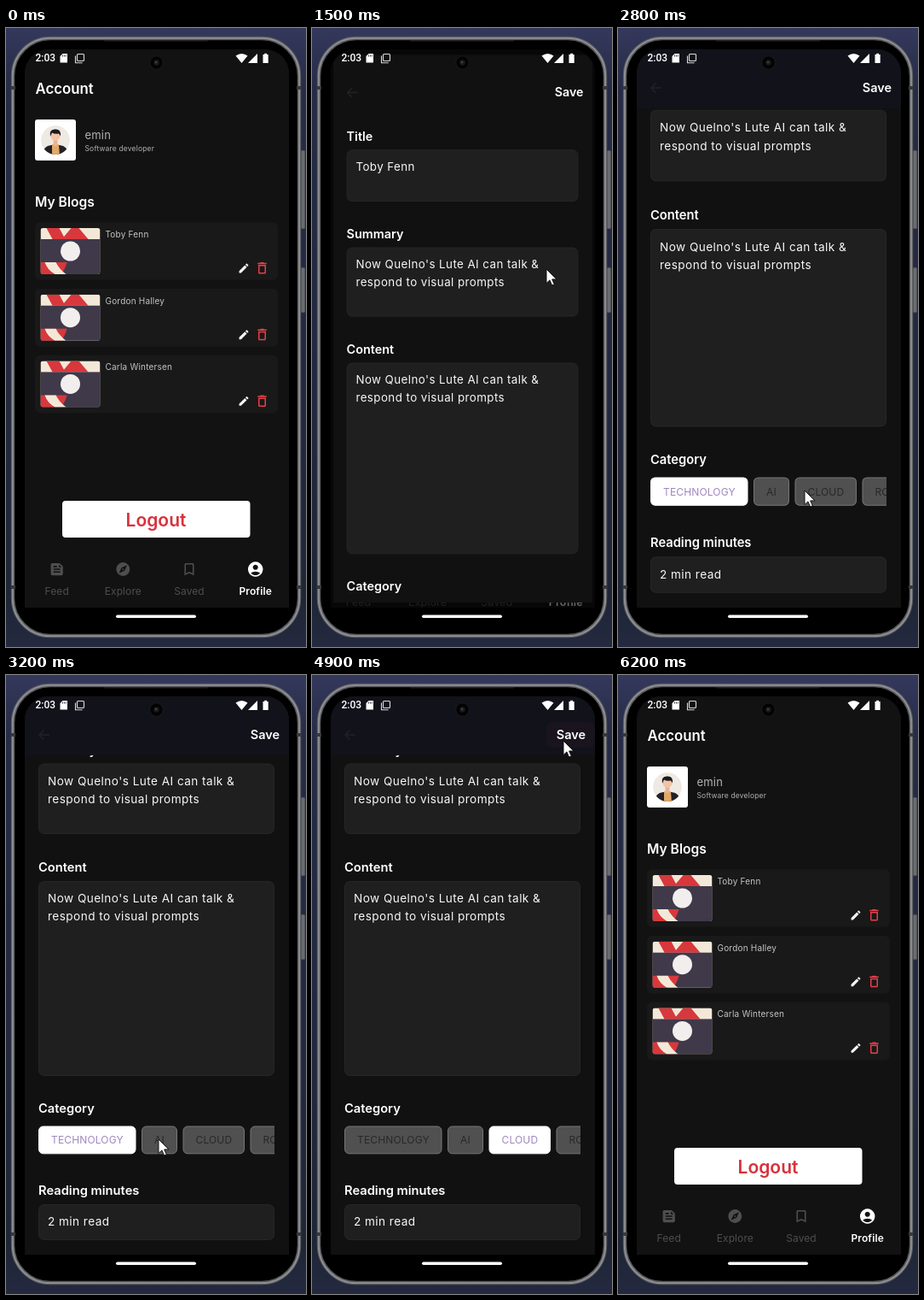
Recreate the animation shown at these times as an HTML page. Size 352 by 724 pixels, loop 6400 ms.

```html
<!DOCTYPE html>
<html lang="en">
<head>
<meta charset="utf-8">
<title>Blog app</title>
<style>
html, body { margin: 0; width: 100%; height: 100%; overflow: hidden; background: #23273f; }
svg { display: block; width: 352px; height: 724px; }
text { font-family: Inter, Roboto, sans-serif; white-space: pre; }
</style>
</head>
<body>
<svg id="stage" viewBox="0 0 352 724" xmlns="http://www.w3.org/2000/svg"></svg>
<script>
const LOOP = 6400, STEP = 100, MAX_SCROLL = 151;
const stage = document.getElementById('stage');

// Markup helpers
const rect = (x, y, w, h, fill, r = 0, more = '') =>
  `<rect x="${x}" y="${y}" width="${w}" height="${h}" rx="${r}" fill="${fill}" ${more}/>`;
const circle = (x, y, r, fill, more = '') =>
  `<circle cx="${x}" cy="${y}" r="${r}" fill="${fill}" ${more}/>`;
const path = (d, fill, more = '') => `<path d="${d}" fill="${fill}" ${more}/>`;
const text = (s, x, y, size, fill = '#fff', weight = 400, ls = 0, more = '') =>
  `<text x="${x}" y="${y}" font-size="${size}" fill="${fill}" font-weight="${weight}" letter-spacing="${ls}" ${more}>${s}</text>`;
const icon = (d, cx, cy, size, fill) =>
  `<g transform="translate(${cx - size / 2} ${cy - size / 2}) scale(${size / 24})">${path(d, fill, 'fill-rule="evenodd"')}</g>`;

const ICONS = {
  feed: 'M16 3H5c-1.1 0-2 .9-2 2v14c0 1.1.9 2 2 2h14c1.1 0 2-.9 2-2V8zM7 7h5v2H7zM17 17H7v-2h10zM17 13H7v-2h10zM15 9V5l4 4z',
  explore: 'M12 10.9a1.1 1.1 0 1 0 .01 0zM12 2a10 10 0 1 0 .01 0zM14.2 14.2L6 18l3.8-8.2L18 6z',
  saved: 'M17 3H7c-1.1 0-2 .9-2 2v16l7-3 7 3V5c0-1.1-.9-2-2-2zM17 18l-5-2.2L7 18V5h10z',
  profile: 'M12 2a10 10 0 1 0 .01 0zM12 6a3.5 3.5 0 1 1-.01 0zM12 20c-2 0-4.4-.8-6.1-2.9C7.5 15.8 9.7 15 12 15s4.5.8 6.1 2.1C16.4 19.2 14 20 12 20z',
  edit: 'M3 17.25V21h3.75L17.8 9.94l-3.75-3.75zM20.7 7.04c.4-.4.4-1 0-1.4L18.4 3.3c-.4-.4-1-.4-1.4 0l-1.9 1.8 3.75 3.75z',
  trash: 'M6 19c0 1.1.9 2 2 2h8c1.1 0 2-.9 2-2V7H6zM8 9h8v10H8zM15.5 4l-1-1h-5l-1 1H5v2h14V4z'
};

function phone() {
  const buttons = [[143, 92], [280, 53]].map(([y, h]) => rect(346, y, 5, h, '#6b6c72', 1.5, 'stroke="#33343c" stroke-width=".8"')).join('');
  const seams = [[6, 68], [341, 68], [6, 652], [341, 652]].map(([x, y]) => rect(x, y, 5, 4, '#38393c')).join('');
  return rect(0, 0, 352, 724, 'url(#wall)') + buttons +
    rect(8, 12, 336, 699, '#000', 44, 'stroke="#5a5b5f" stroke-width="4.4"') +
    rect(7.8, 11.8, 336.4, 699.4, 'none', 44, 'stroke="#909194" stroke-width="1.8"') + seams +
    rect(115, 14, 122, 1.6, '#2b2224', .8);
}

function statusBar() {
  return text('2:03', 34.5, 39.3, 12, '#fff', 500, 0, 'style="font-family:Roboto,sans-serif"') +
    path('M66.5 30H72v10.5H63.5V33z', '#fff') +
    path('M66.5 31.5v2M68.5 31.5v2M70.3 31.5v2', 'none', 'stroke="#111" stroke-width=".8"') +
    rect(83.5, 30.5, 8, 8, 'none', 1, 'stroke="#ddd" stroke-width="1.1"') +
    path('M81.5 32.5v8.2h8.2', 'none', 'stroke="#ddd" stroke-width="1.1"') +
    path('M269.5 32.5Q276.5 27.5 283.5 32.5L276.5 41z', '#fff') +
    path('M295 30v11H284z', '#fff') +
    path('M301.5 31h1.7v-1.3h2.8V31h1.7v10h-6.2z', '#fff') +
    circle(176.5, 40.5, 7.7, '#030303', 'stroke="#1f1e21" stroke-width=".8"') +
    circle(176.5, 40.5, 3.2, '#1b1a1d') + circle(176, 40, 1.2, '#454247');
}

function avatar() {
  return rect(34, 107, 48, 48, '#fff', 3) +
    `<g clip-path="url(#face)">` + circle(58, 131, 17, '#efe9e3') +
    path('M42 150q1-12 11-13h10q10 1 11 13z', '#232127') +
    path('M54 136h8l1 14h-9z', '#e2a866') +
    rect(55.5, 130, 5, 8, '#e9b594', 2) + circle(58, 126.5, 5.3, '#f2c3a4') +
    path('M52 127q-2-8 5-8.500q8-1 7 8l-2-3q-5 1-8-1z', '#1d1a1f') + '</g>';
}

function thumb() {
  return `<g clip-path="url(#thumb)">` + rect(0, 0, 70, 54, '#f3e8d8') +
    path('M7 0h15L29 13H14zM36 0h9l11 13H25z', '#d8383c') +
    rect(0, 13, 70, 41, '#40394a') +
    path('M0 40h31q-2 8-7 14H0z', '#d8383c') +
    path('M5 40h13q4 8 12 14H17Q8 49 5 40z', '#f3e8d8') +
    circle(35, 27, 11.5, '#f2eeee') + '</g>';
}

function card(name, i) {
  return `<g transform="translate(34 ${227.3 + i * 77.7})">` +
    rect(0, 0, 285, 67.5, '#191919', 6) +
    `<g transform="translate(6.500 6.700)">${thumb()}</g>` +
    text(name, 82.5, 17.8, 10, '#c4c4c4', 400, .2) +
    icon(ICONS.edit, 245, 53.7, 14.5, '#f4f4f4') +
    icon(ICONS.trash, 266.5, 53.5, 18, '#e8404a') + '</g>';
}

function tab(name, key, x, on) {
  const tint = on ? '#fff' : '#4e4e4e';
  return icon(ICONS[key], x, 633, on ? 21 : 19, tint) +
    text(name, x, 663, 12, tint, on ? 600 : 400, .1, 'text-anchor="middle"');
}

function profilePage() {
  return rect(22, 25, 310, 653, '#121212') +
    text('Account', 34.5, 76.5, 16.8, '#fff', 600) + avatar() +
    text('emin', 92.5, 130, 13, '#b4b4b4', 400, .2) +
    text('Software developer', 92.5, 144, 8.5, '#b0b0b0', 400, .17) +
    text('My Blogs', 34, 209, 15.6, '#fff', 600) +
    ['Toby Fenn', 'Gordon Halley', 'Carla Wintersen'].map(card).join('') +
    rect(66, 553, 220.5, 43, '#fff', 4) +
    text('Logout', 176, 582.5, 21, '#d9303a', 600, 0, 'text-anchor="middle"') +
    tab('Feed', 'feed', 59.7, false) + tab('Explore', 'explore', 137.3, false) +
    tab('Saved', 'saved', 215, false) + tab('Profile', 'profile', 292.7, true) +
    circle(279, 281, 0, '#fff', 'id="ripple"');
}

const field = (label, y, h, lines) =>
  text(label, 38, y - 10.8, 14.7, '#fff', 600) +
  rect(38.5, y + .5, 276, h - 1, '#1f1f1f', 6, 'stroke="#262626"') +
  lines.map((s, i) => text(s, 49, y + 25.4 + i * 21, 13.6, '#f8f8f8', 400, .45)).join('');

const CHIPS = [['TECHNOLOGY', 38, 114.5], ['AI', 159, 42], ['CLOUD', 207.5, 72.5], ['ROBOTICS', 286.5, 94]];

function editPage() {
  const blurb = ["Now Quelno's Lute AI can talk &amp;", 'respond to visual prompts'];
  const chips = CHIPS.map(([s, x, w]) => `<g class="chip">` +
    rect(x + .5, 679, w - 1, 31.8, '#505050', 5, 'stroke="#767676"') +
    text(s, x + 15, 699.4, 12, '#282828', 400, .15) + '</g>').join('');
  return rect(22, 25, 310, 653, '#111') +
    `<g clip-path="url(#body)"><g id="list">` +
    field('Title', 138, 62, ['Toby Fenn']) + field('Summary', 254.5, 82.5, blurb) +
    field('Content', 392, 228, blurb) + text('Category', 38, 663.2, 14.7, '#fff', 600) +
    `<g clip-path="url(#row)">${chips}</g>` + field('Reading minutes', 770, 42, ['2 min read']) +
    '</g></g>' + rect(22, 25, 310, 69, '#12121b', 0, 'id="bar"') +
    path('M51 70H39.500M44.500 64.500L39 70l5.500 5.500', 'none', 'stroke="#222226" stroke-width="1.4"') +
    rect(275, 55, 57, 30, '#ff5a64', 8, 'id="glow"') +
    text('Save', 286.8, 75, 14.5, '#fff', 600);
}

const clip = (id, shape) => `<clipPath id="${id}">${shape}</clipPath>`;
const stop = (at, tint) => `<stop offset="${at}" stop-color="${tint}"/>`;
stage.innerHTML = '<defs>' +
  `<linearGradient id="wall" x2="0" y2="1">${stop(0, '#34385c')}${stop(.1, '#262b46')}${stop(.55, '#232840')}${stop(.92, '#1e2636')}${stop(1, '#24293f')}</linearGradient>` +
  clip('screen', path('M22 678V53a28 28 0 0 1 28-28h254a28 28 0 0 1 28 28v625z', '#fff')) +
  clip('body', rect(22, 94, 310, 584, '#fff')) + clip('row', rect(22, 670, 293, 50, '#fff')) +
  clip('thumb', rect(0, 0, 70, 54, '#fff', 3)) + clip('face', circle(58, 131, 17, '#fff')) + '</defs>' +
  phone() + `<g clip-path="url(#screen)">` + rect(22, 25, 310, 653, '#121212') +
  `<g id="profile">${profilePage()}</g>` + rect(22, 25, 310, 653, '#000', 0, 'id="scrim"') +
  `<g id="edit">${editPage()}</g></g>` + statusBar() +
  rect(129, 686.5, 94, 3.6, '#fff', 1.8) +
  `<g id="cursor">` + path('M0 0V16.500L3.900 12.900L6.600 19L9.300 17.800L6.700 11.900H12z', '#fff', 'stroke="#111" stroke-width="1" stroke-linejoin="round"') + '</g>';

const $ = id => document.getElementById(id);
const ui = Object.fromEntries(['profile', 'edit', 'scrim', 'list', 'bar', 'glow', 'ripple', 'cursor'].map(id => [id, $(id)]));
const chipEls = [...document.querySelectorAll('.chip')];

// Timing helpers
const clamp = v => Math.min(1, Math.max(0, v));
const span = (t, a, b) => clamp((t - a) / (b - a));
const ease = p => p * p * (3 - 2 * p);
const out = p => 1 - (1 - p) ** 3;

const MOVES = [
  [300, 362, 420], [800, 275, 282], [1900, 275, 282], [2300, 191, 282], [2450, 191, 282],
  [2800, 219, 541], [2900, 219, 541], [3200, 179, 543], [3500, 179, 543], [3800, 238, 539],
  [4400, 238, 539], [4800, 295, 77], [5000, 295, 77], [5400, 362, 120]
];

function cursorAt(t) {
  const i = MOVES.findIndex(m => m[0] > t);
  if (i === 0) return MOVES[0].slice(1);
  if (i < 0) return MOVES[MOVES.length - 1].slice(1);
  const [a, ax, ay] = MOVES[i - 1], [b, bx, by] = MOVES[i], p = ease(span(t, a, b));
  return [ax + (bx - ax) * p, ay + (by - ay) * p];
}

const zoom = (el, k) => el.setAttribute('transform', `translate(177 365) scale(${k}) translate(-177 -365)`);

function mix(a, b, p) {
  return `rgb(${a.map((v, i) => Math.round(v + (b[i] - v) * p)).join()})`;
}

function draw(t) {
  const push = span(t, 1300, 1700), pop = span(t, 5100, 5500);
  const open = out(push), shut = out(pop);
  const shown = pop > 0 ? 1 - span(pop, .1, .6) : span(push, .1, .4);
  zoom(ui.profile, 1 + .05 * open * (1 - shut));
  zoom(ui.edit, pop > 0 ? 1 - .1 * shut : .85 + .15 * open);
  ui.edit.setAttribute('opacity', shown);
  ui.scrim.setAttribute('opacity', .6 * span(push, .1, .4) * (1 - span(pop, 0, .6)));

  const scroll = MAX_SCROLL * out(span(t, 2400, 2750));
  const stretch = 1 + .0137 * span(t, 2700, 2800) * (1 - ease(span(t, 2800, 3150)));
  ui.list.setAttribute('transform', `translate(0 678) scale(1 ${stretch}) translate(0 ${-678 - scroll})`);
  ui.bar.setAttribute('opacity', span(t, 2400, 2600));

  const toAi = span(t, 3300, 3500), toCloud = span(t, 4000, 4200);
  const picked = [1 - toAi, toAi - toCloud, toCloud, 0];
  chipEls.forEach((el, i) => {
    const [box, label] = el.children, p = clamp(picked[i]);
    box.setAttribute('fill', mix([80, 80, 80], [255, 255, 255], p));
    box.setAttribute('stroke', mix([118, 118, 118], [255, 255, 255], p));
    label.setAttribute('fill', mix([40, 40, 40], [160, 136, 192], p));
  });

  ui.glow.setAttribute('opacity', .03 * span(t, 4700, 4900) * (1 - span(t, 5100, 5300)));
  ui.ripple.setAttribute('r', 14 * out(span(t, 1100, 1300)));
  ui.ripple.setAttribute('opacity', t < 1200 ? 0 : .1 * (1 - span(t, 1300, 1600)));
  const [x, y] = cursorAt(t);
  ui.cursor.setAttribute('transform', `translate(${x} ${y})`);
}

const start = performance.now();
function tick() {
  const t = (performance.now() - start) % LOOP;
  draw(Math.floor(t / STEP) * STEP);
  requestAnimationFrame(tick);
}
tick();
</script>
</body>
</html>
```
